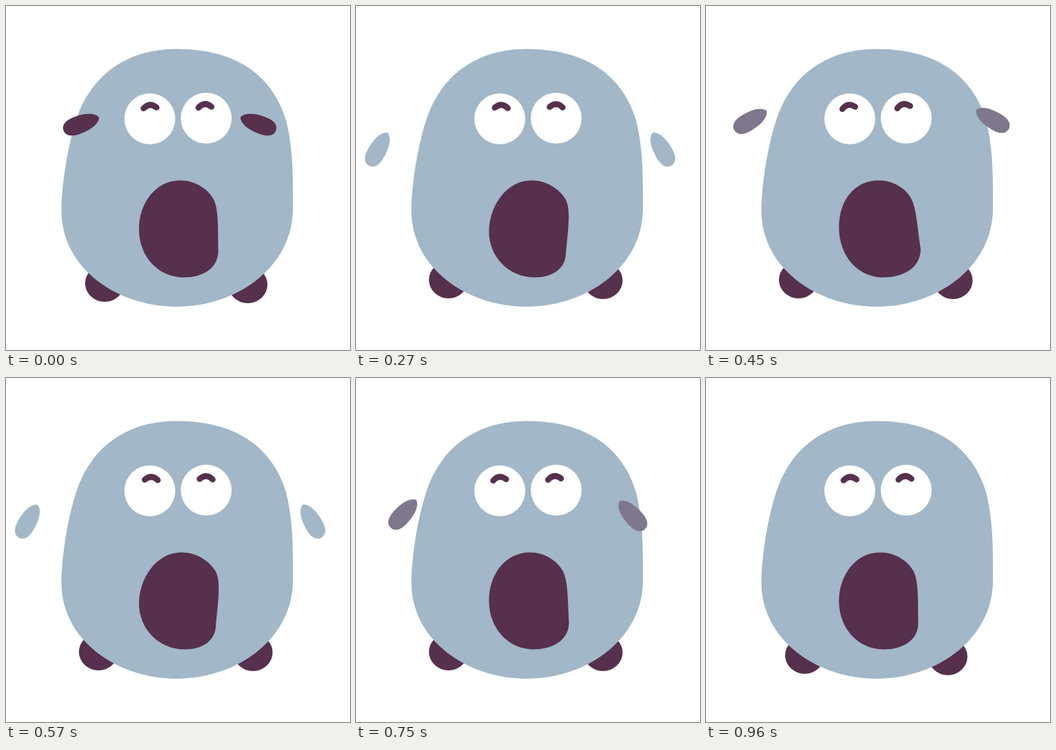
An HTML page for the animation above (0.99 s loop, 500 by 500 pixels).

```html
<!DOCTYPE html>
<html lang="en">
<head>
<meta charset="utf-8">
<title>Crying blob</title>
<style>
  html, body { margin: 0; width: 100%; height: 100%; overflow: hidden; background: #fff; }
  svg { display: block; width: 100vw; height: 100vh; }
  .dark { fill: #56304d; }
  .brow { fill: none; stroke: #56304d; stroke-width: 8.5; stroke-linecap: round; }
</style>
</head>
<body>
<svg viewBox="0 0 500 500">
  <defs>
    <path id="brow" class="brow" d="M-9.5 2Q0-7 9.5 2"/>
    <path id="tear" d="M28 0C24-10 8-13-6-13S-27-8-27 0S-20 13-6 13S24 10 28 0Z"/>
    <ellipse id="foot" class="dark" rx="28.5" ry="27"/>
  </defs>
  <use id="footL" href="#foot"/>
  <use id="footR" href="#foot"/>
  <path fill="#a2b7c7" d="M248 62.5C168 62.5 124 108 105.5 156C89 200 80.5 265 80.5 297C80.5 382 163 437 247 437C341 437 417 375 417 295C417 250 418 210 407 166C390 110 345 62.5 248 62.5Z"/>
  <g fill="#fff">
    <circle cx="209" cy="164" r="37"/>
    <circle cx="291" cy="163" r="37"/>
  </g>
  <use id="browL" href="#brow"/>
  <use id="browR" href="#brow"/>
  <path id="mouth" class="dark"/>
  <use id="tearL" href="#tear"/>
  <use id="tearR" href="#tear"/>
</svg>
<script>
  const LOOP = 990, STEP = 30, BURST = 10;
  const el = id => document.getElementById(id);
  const lerp = (a, b, t) => a + (b - a) * t;
  const clamp = t => Math.min(1, Math.max(0, t));
  const ease = t => (1 - Math.cos(Math.PI * clamp(t))) / 2;

  // Face sway on every 150 ms beat; each move takes 4/5 of a beat
  const BEAT = 150, sway = [0, 1, -1, 1, -1, 0.3, 0, 0];
  function swayAt(t) {
    const i = Math.floor(t / BEAT);
    return lerp(sway[i], sway[i + 1], ease((t / BEAT - i) * 1.25));
  }

  // Each burst aims at its own height; dx and dy scale that per side
  const aims = [0, -0.85, 1.15];
  const sides = [
    { id: 'tearL', x: 109, land: 32, dx: 5, dy: 35, flip: 1 },
    { id: 'tearR', x: 367, land: 445, dx: -17, dy: 39, flip: -1 }
  ];
  const GRAVITY = 49, START_Y = 171.5, LAND_Y = 208.5;
  const dark = [86, 48, 77], pale = [162, 183, 199];

  function place(id, x, y, turn = 0, flip = 1) {
    el(id).setAttribute('transform', `translate(${x} ${y}) scale(${flip} 1) rotate(${turn})`);
  }

  function drawTear({ id, x, land, dx, dy, flip }, aim, p) {
    el(id).style.display = aim === undefined ? 'none' : '';
    if (aim === undefined) return;
    const y = lerp(START_Y + dy * aim, LAND_Y, p) - GRAVITY * p * (1 - p);
    const tilt = lerp(20.4 + 15 * aim, 60, p ** 1.36);
    const rgb = dark.map((c, i) => Math.round(lerp(c, pale[i], p ** 1.1)));
    place(id, lerp(x + dx * aim, land, p), y, -tilt, flip);
    el(id).setAttribute('fill', `rgb(${rgb})`);
  }

  function mouthPath(w) {
    const top = 253 - 2 * w, edge = 308.5 + 3.5 * w;
    return `M${top} 253.5c23 0 41 13 ${49 - w} 28` +
      `c7 15 ${6 + 2 * w} 38.5 ${6.5 + 6.5 * w} ${74.5 - 3 * w}` +
      `C${edge} 382 285 394.5 ${258.5 - 1.5 * w} 394.5` +
      `C221 394.5 193.3 363.5 193.3 ${325 - 3 * w}S217.5 253.5 ${top} 253.5Z`;
  }

  function draw(t) {
    const w = swayAt(t), turn = -4 - 6 * w;
    place('browL', 209.2 - 2 * w, 146.2, turn);
    place('browR', 289 - 2 * w, 145.1, turn);
    el('mouth').setAttribute('d', mouthPath(w));

    const f = ease(Math.min(t, 960 - t) / 120);
    place('footL', lerp(143.5, 134.5, f), lerp(403, 398, f));
    place('footR', lerp(351.5, 359, f), lerp(405, 399, f));

    const tick = Math.round(t / STEP);
    const aim = aims[Math.floor(tick / BURST)];
    for (const side of sides) drawTear(side, aim, (tick % BURST) / (BURST - 1));
  }

  function loop() {
    const t = performance.now() % LOOP;
    draw(Math.floor(t / STEP) * STEP);
    requestAnimationFrame(loop);
  }
  loop();
</script>
</body>
</html>
```
